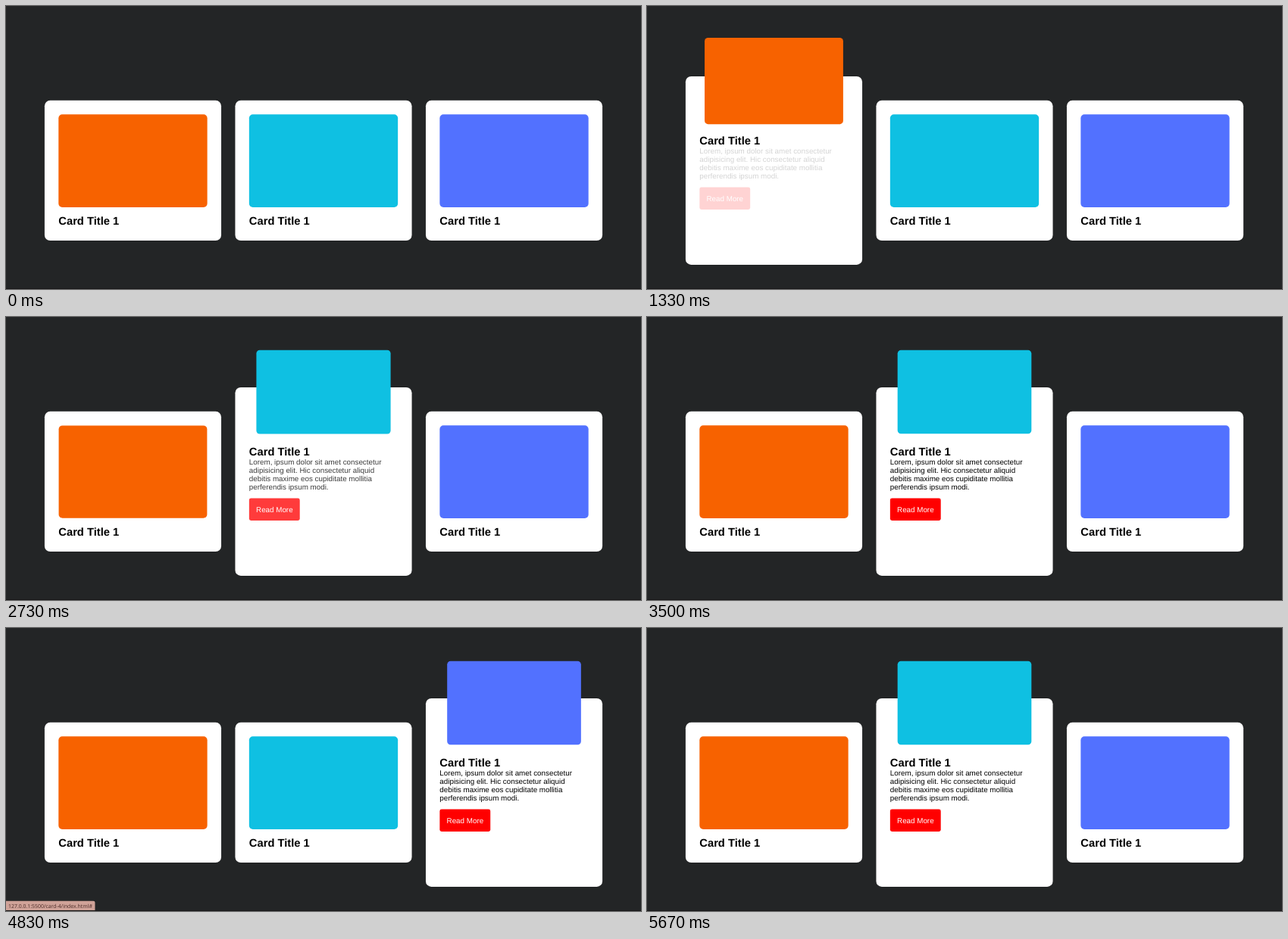
Recreate the animation shown at these times as an HTML page. Size 838x374 px, loop 5.81 s.

```html
<!DOCTYPE html>
<html lang="en">
<head>
<meta charset="utf-8">
<title>Hover cards</title>
<style>
  html, body { margin: 0; width: 100%; height: 100%; overflow: hidden; background: #232526; }
  svg { display: block; width: 838px; height: 374px; }
  text { font: 16px "Liberation Sans", Arial, sans-serif; text-rendering: geometricPrecision; }
  .title { font-size: 24px; font-weight: bold; }
  .more { fill: #fff; }
  #status text { font: 11.25px "Open Sans", sans-serif; fill: #4a2a26; }
</style>
</head>
<body>
<svg viewBox="0 0 838 374">
  <!-- page laid out at 1366 px wide, scaled down to the stage -->
  <g transform="scale(.61347)">
    <g id="cards"></g>
    <g id="status">
      <path d="M0 588H188Q191.5 588 191.5 591.5V610H0Z" fill="#cfa298"/>
      <text x="5" y="603">127.0.0.1:5500/card-4/index.html#</text>
    </g>
  </g>
  <rect y="373" width="838" height="1" fill="#171717"/>
</svg>
<script>
const LOOP = 5810, TICK = 70;
const COLORS = ['#f76200', '#0fc0e2', '#5271ff'];
const LINES = [
  'Lorem, ipsum dolor sit amet consectetur',
  'adipisicing elit. Hic consectetur aliquid',
  'debitis maxime eos cupiditate mollitia',
  'perferendis ipsum modi.'
];
// [time, hovered card]
const HOVERS = [[0, -1], [1185, 0], [2445, 1], [3595, 2], [4965, 1]];

const status = document.getElementById('status');
const holder = document.getElementById('cards');
holder.innerHTML = COLORS.map((color, i) => `
  <g transform="translate(${83 + 410 * i} 0)">
    <rect class="panel" width="380" rx="12" fill="#fff"/>
    <rect class="image" x="-160" y="-100" width="320" height="200" rx="8" fill="${color}"/>
    <text class="title" x="30">Card Title 1</text>
    <g class="details">
      ${LINES.map((line, n) => `<text x="30" y="${318 + 18 * n}">${line}</text>`).join('')}
      <rect x="30" y="390.5" width="109" height="48" rx="4" fill="#f00"/>
      <text class="more" x="45" y="420">Read More</text>
    </g>
  </g>`).join('');

const cards = [...holder.children].map(card => {
  const part = name => card.querySelector('.' + name);
  return { panel: part('panel'), image: part('image'), title: part('title'), details: part('details') };
});

const ramp = (t, from, to) => Math.min(1, Math.max(0, (t - from) / (to - from)));

// CSS "ease": cubic-bezier(.25, .1, .25, 1)
function ease(x) {
  const bezier = (u, a, b) => 3 * u * (1 - u) ** 2 * a + 3 * u * u * (1 - u) * b + u ** 3;
  let low = 0, high = 1;
  for (let i = 0; i < 24; i++) {
    const mid = (low + high) / 2;
    if (bezier(mid, .25, .25) < x) low = mid; else high = mid;
  }
  return bezier(low, .1, 1);
}

function pose(card, open, scale, opacity) {
  card.panel.setAttribute('y', open ? 151.5 : 203.5);
  card.panel.setAttribute('height', open ? 406 : 302);
  card.image.setAttribute('transform', `translate(190 ${open ? 161.5 : 333.5}) scale(${scale})`);
  card.title.setAttribute('y', open ? 298.5 : 470.5);
  card.details.setAttribute('opacity', opacity);
}

function draw(t) {
  const step = HOVERS.findLastIndex(([start]) => t >= start);
  const [start, active] = HOVERS[step];
  const previous = step ? HOVERS[step - 1][1] : -1;
  const age = t - start;
  const shrink = .1 * ease(ramp(age, 0, 360));

  cards.forEach((card, i) => {
    const open = i === active;
    const scale = open ? 1 - shrink : i === previous ? .9 + shrink : 1;
    pose(card, open, scale, open ? ramp(age, 105, 340) : 0);
  });
  status.setAttribute('opacity', ramp(t, 4600, 4740) - ramp(t, 5215, 5440));
}

function frame() {
  const t = performance.now() % LOOP;
  draw(Math.floor(t / TICK) * TICK);
  requestAnimationFrame(frame);
}
frame();
</script>
</body>
</html>
```
